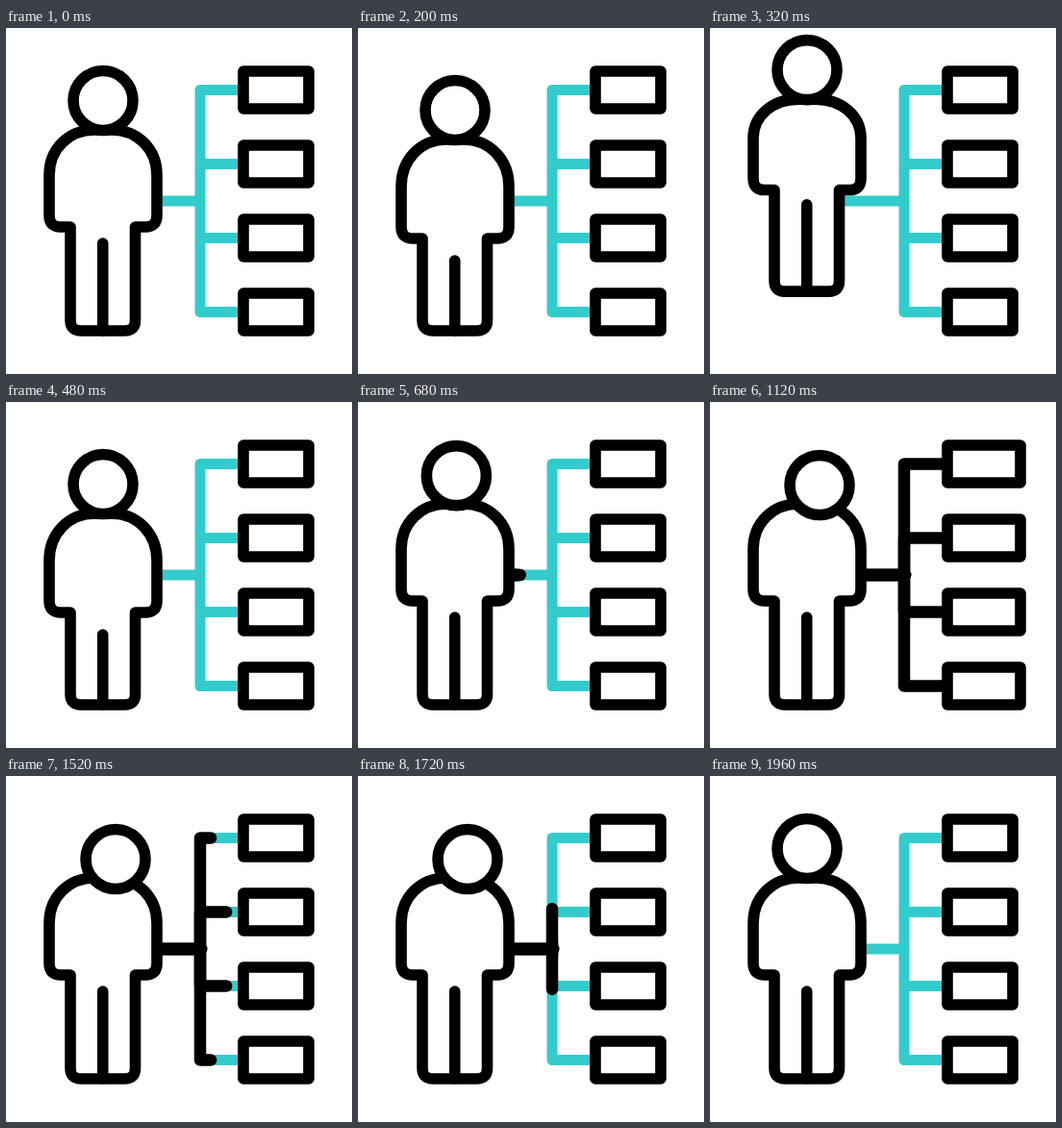
An HTML page that plays this animation: 360x360 px, repeating every 2 s.

```html
<!DOCTYPE html>
<html lang="en">
<head>
<meta charset="utf-8">
<title>Person and branches</title>
<style>
  html, body { margin: 0; width: 100%; height: 100%; overflow: hidden; background: #fff; }
  svg { display: block; width: 100vw; height: 100vh; }
  path, circle, rect { stroke-width: 11.6; stroke-linecap: round; stroke-linejoin: round; }
  .teal { fill: none; stroke: #33cccc; stroke-width: 11; }
  .line { fill: none; stroke: #000; }
  .wire { stroke-width: 12.5; }
  .solid { fill: #fff; stroke: #000; }
</style>
</head>
<body>
<svg viewBox="0 0 360 360">
  <path class="teal" d="M136 180H202M247 64.5H202V295.5H247M202 141.5H247M202 218.5H247"/>
  <g id="wires"></g>
  <g id="boxes"></g>
  <path id="body" class="solid"/>
  <path id="gap" class="line"/>
  <circle id="head" class="solid" r="31"/>
</svg>
<script>
const LOOP = 2000, STEP = 40;
const ROWS = [0, 1, 2, 3].map(i => 64.5 + 77 * i);
const $ = id => document.getElementById(id);

const linear = u => u;
const smooth = u => u * u * (3 - 2 * u);
const ramp = (t, from, to) => Math.min(1, Math.max(0, (t - from) / (to - from)));

// Rises from 0 to 1 over a..b, stays, and falls back over c..d
const hold = (t, a, b, c, d, ease = smooth) => ease(ramp(t, a, b)) - ease(ramp(t, c, d));

function set(el, attrs) {
  for (const name in attrs) el.setAttribute(name, attrs[name]);
  return el;
}

function add(parent, tag, attrs) {
  const el = document.createElementNS("http://www.w3.org/2000/svg", tag);
  return $(parent).appendChild(set(el, attrs));
}

const wires = ROWS.map(y => add("wires", "path",
  { class: "line wire", pathLength: 1, d: `M157 180H203H202V${y}H247` }));
const boxes = ROWS.map(y => add("boxes", "rect",
  { class: "solid", x: 247, y: y - 19.5, width: 68, height: 39 }));

function drawPerson(t) {
  const crouch = hold(t, 120, 200, 200, 260) + hold(t, 380, 480, 480, 640);
  const lift = 43 * Math.sin(Math.PI * ramp(t, 200, 400));
  const nod = hold(t, 640, 840, 1760, 1960);

  const top = 10 * crouch - 0.78 * lift;
  const arm = 12 * crouch - 0.94 * lift;
  const crotch = 224 + 18 * crouch - 0.98 * lift;
  const neck = 106 + top, elbow = 153 + arm, hand = 207 + arm, foot = 315 - lift;
  const bend = neck + 0.43 * (elbow - neck);

  set($("body"), { d:
    `M67 ${hand}H57Q45 ${hand} 45 ${hand - 12}V${elbow}C45 ${bend} 65 ${neck} 92 ${neck}` +
    `H110C137 ${neck} 157 ${bend} 157 ${elbow}V${hand - 12}Q157 ${hand} 145 ${hand}H134.5` +
    `V${foot - 11}Q134.5 ${foot} 123.5 ${foot}H78Q67 ${foot} 67 ${foot - 11}Z` });
  set($("gap"), { d: `M100.7 ${crotch}V${foot}` });
  set($("head"), { cx: 101 + 13 * nod, cy: 75.5 + top + 11 * nod });
}

function drawBranches(t) {
  const outer = hold(t, 660, 1020, 1440, 1930, linear);
  const inner = hold(t, 660, 960, 1460, 1900, linear);
  wires.forEach((wire, i) => {
    const shown = i % 3 ? inner : outer;
    wire.style.display = shown > 0 ? "" : "none";
    set(wire, { "stroke-dasharray": `${shown} 2` });
  });
  const stretch = 9.5 * hold(t, 1000, 1160, 1200, 1400);
  boxes.forEach(box => set(box, { width: 68 + stretch }));
}

function frame() {
  const t = Math.floor(performance.now() % LOOP / STEP) * STEP;
  drawPerson(t);
  drawBranches(t);
  requestAnimationFrame(frame);
}
frame();
</script>
</body>
</html>
```
